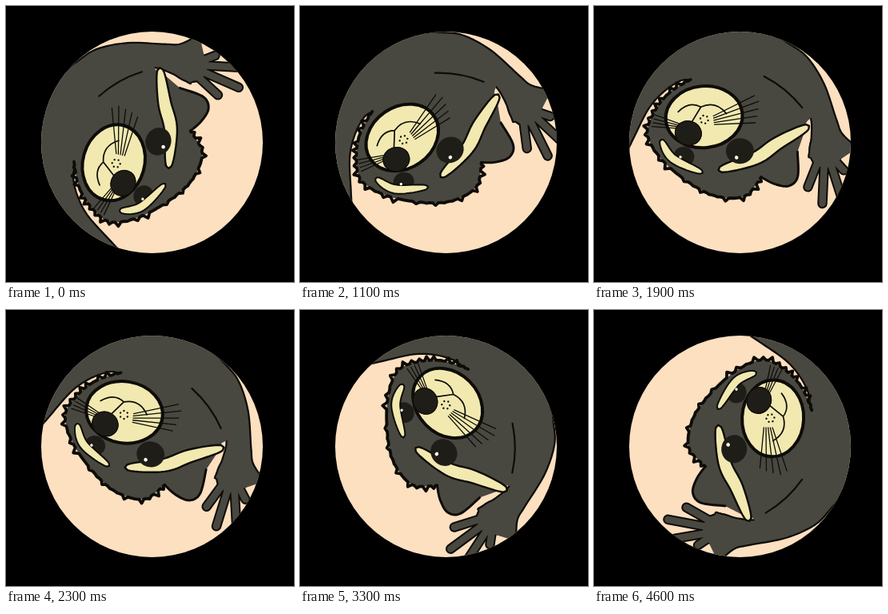
An HTML page with a canvas that plays this animation: 360x345 px, repeating every 4.7 s.

```html
<!DOCTYPE html>
<html lang="en">
<head>
<meta charset="utf-8">
<title>Spinning raccoon</title>
<style>
html, body { margin: 0; width: 100%; height: 100%; overflow: hidden; background: #000; }
canvas { display: block; width: 360px; height: 345px; }
</style>
</head>
<body>
<canvas id="stage" width="360" height="345"></canvas>
<script>
const ctx = document.getElementById('stage').getContext('2d');
const LOOP = 4700, STEP = 100, UPRIGHT = 1500;
const SPIN = 0.0363 * Math.PI / 180;   // radians per ms
const CX = 182.5, CY = 170.5, R = 138.5;
const PEACH = '#fde0c0', FUR = '#484740', CREAM = '#f1e9b0';
const LINE = '#0e0c08', DARK = '#1f1d17', GLINT = '#fffde6';

const rad = deg => deg * Math.PI / 180;

function seeded(seed) {
  return () => (seed = seed * 16807 % 2147483647) / 2147483647;
}

// Dense points on a Catmull-Rom curve through key points written as "x,y x,y"
function smooth(text, n = 10) {
  const p = text.split(' ').map(s => s.split(',').map(Number));
  const at = i => p[Math.max(0, Math.min(p.length - 1, i))];
  const out = [];
  for (let i = 0; i < p.length - 1; i++) {
    const [a, b, c, d] = [-1, 0, 1, 2].map(k => at(i + k));
    for (let s = 0; s < n; s++) {
      const u = s / n;
      out.push([0, 1].map(k => b[k] + u / 2 * (c[k] - a[k] +
        u * (2 * a[k] - 5 * b[k] + 4 * c[k] - d[k] + u * (3 * (b[k] - c[k]) + d[k] - a[k])))));
    }
  }
  out.push(at(p.length));
  return out;
}

// Moves each point sideways by amount(u, i)
function offset(pts, amount) {
  const last = pts.length - 1;
  return pts.map(([x, y], i) => {
    const a = pts[Math.max(0, i - 1)], b = pts[Math.min(last, i + 1)];
    const dx = b[0] - a[0], dy = b[1] - a[1], k = amount(i / last, i) / Math.hypot(dx, dy);
    return [x - dy * k, y + dx * k];
  });
}

const toPath = (pts, close) => new Path2D('M' + pts.join('L') + (close ? 'Z' : ''));

// Band with rounded ends along a curve
function ribbon(text, half) {
  const mid = smooth(text);
  const width = u => half * Math.abs(Math.sin(Math.PI * u)) ** 0.4;
  return toPath([...offset(mid, width), ...offset(mid, u => -width(u)).reverse()], true);
}

// Jagged fur on the outer side of a curve
function shaggy(pts, size) {
  const rnd = seeded(17);
  return toPath(offset(pts, (u, i) => i % 3 ? 0 : size * rnd()));
}

function oval(x, y, rx, ry, tilt = 0) {
  const path = new Path2D();
  path.ellipse(x, y, rx, ry, tilt, 0, Math.PI * 2);
  return path;
}

function fan(count, seg) {
  const path = new Path2D();
  for (let i = 0; i < count; i++) {
    const [x, y, x2, y2] = seg(i);
    path.moveTo(x, y);
    path.lineTo(x2, y2);
  }
  return path;
}

function fill(path, color) { ctx.fillStyle = color; ctx.fill(path); }
function stroke(path, width, color = LINE) {
  ctx.lineWidth = width;
  ctx.strokeStyle = color;
  ctx.stroke(path);
}

// Body and arms
const farArm = smooth('46,225 51,200 60,159 73,133 90,114 103,109');
const armOut = smooth('185,28 208,36 236,47 265,74 291,113 303,129 326,141');
const armIn = smooth('247,109 261,118 268,140 271,166');
const fold = new Path2D('M191 83Q222 90 247 109');
const body = toPath([[0, 225], ...farArm, [130, 165], [210, 180], [250, 150], [257, 124],
  ...armIn.slice(10), [300, 170], ...armOut.slice().reverse(), [180, 0], [0, 0]], true);
const palm = oval(289, 150, 20, 25);
const fingers = fan(4, i => {
  const a = rad(100 - 21 * i), len = 54 + 27 * i - 11 * i * i;
  return [284 + 5 * i, 160, 288 + len * Math.cos(a), 150 + len * Math.sin(a)];
});

// Head
const jaw = smooth('103,110 82,132 70,158 68,190 95,217 136,236 172,243 205,234 219,206');
const ear = smooth('219,206 237,210 255,208 263,194 255,164');
const skull = toPath([...jaw, ...ear, [258, 128], [230, 115], [150, 108]], true);
const jawFur = shaggy(jaw, 6);
const brow = ribbon('261,129 229,159 206,185 165,211', 8.5);
const smallBrow = ribbon('86,192 106,211 147,219', 5.5);
const snout = oval(131, 151, 48, 38.5, rad(-20));
const mouth = new Path2D('M98 153Q108 136 124 140Q140 127 157 140M118 160L124 140');
const whiskers = fan(5, i => {
  const a = rad(6 * i - 41), len = 60 - 3 * Math.abs(i - 1);
  const x = 142 + i, y = 147 + 2.5 * i;
  return [x, y, x + len * Math.cos(a), y + len * Math.sin(a)];
});
const leftWhiskers = fan(4, i => [104, 167 + 2 * i, 71, 164 + 5 * i]);

function drawBody() {
  [palm, toPath(armOut), toPath(armIn), toPath(farArm)].forEach(p => stroke(p, 4.5));
  stroke(fingers, 12.5);
  fill(body, FUR);
  fill(palm, FUR);
  stroke(fingers, 8.5, FUR);
  stroke(fold, 2.2);
}

function drawHead() {
  fill(skull, FUR);
  stroke(jawFur, 3.8);
  stroke(toPath(ear), 3);

  fill(oval(119, 205, 13, 12), DARK);
  fill(smallBrow, CREAM);
  stroke(smallBrow, 2);
  fill(oval(115, 207, 1.7, 1.7), GLINT);

  fill(brow, CREAM);
  stroke(brow, 2.4);
  fill(oval(185, 181, 17.5, 16, -0.3), DARK);
  fill(oval(183, 190, 2.3, 2.3), GLINT);

  fill(snout, CREAM);
  stroke(snout, 4);
  stroke(mouth, 1.7);
  for (let i = 0; i < 6; i++) {
    fill(oval(132 + 5 * Math.cos(i * 1.05), 154 + 5 * Math.sin(i * 1.05), 1.2, 1.2), LINE);
  }
  stroke(whiskers, 1.3);
  stroke(leftWhiskers, 1.3);
  fill(oval(117, 175.5, 17, 15.5), DARK);
  stroke(oval(117, 175.5, 16.5, 15), 1.2);
}

function draw(t) {
  ctx.fillStyle = '#000';
  ctx.fillRect(0, 0, 360, 345);
  ctx.save();
  ctx.lineCap = ctx.lineJoin = 'round';
  ctx.clip(oval(CX, CY, R, R));
  ctx.fillStyle = PEACH;
  ctx.fillRect(0, 0, 360, 345);
  ctx.translate(CX, CY);
  ctx.rotate((t - UPRIGHT) * SPIN);
  ctx.translate(-CX, -CY);
  drawBody();
  // The head rests low around the upright pose and lifts away from it
  const lift = 1 - Math.exp(-(((t - UPRIGHT) / 1150) ** 4));
  ctx.translate(3.3 * lift, -5 * lift);
  drawHead();
  ctx.restore();
}

function tick() {
  draw(Math.floor(performance.now() % LOOP / STEP) * STEP);
  requestAnimationFrame(tick);
}
tick();
</script>
</body>
</html>
```
